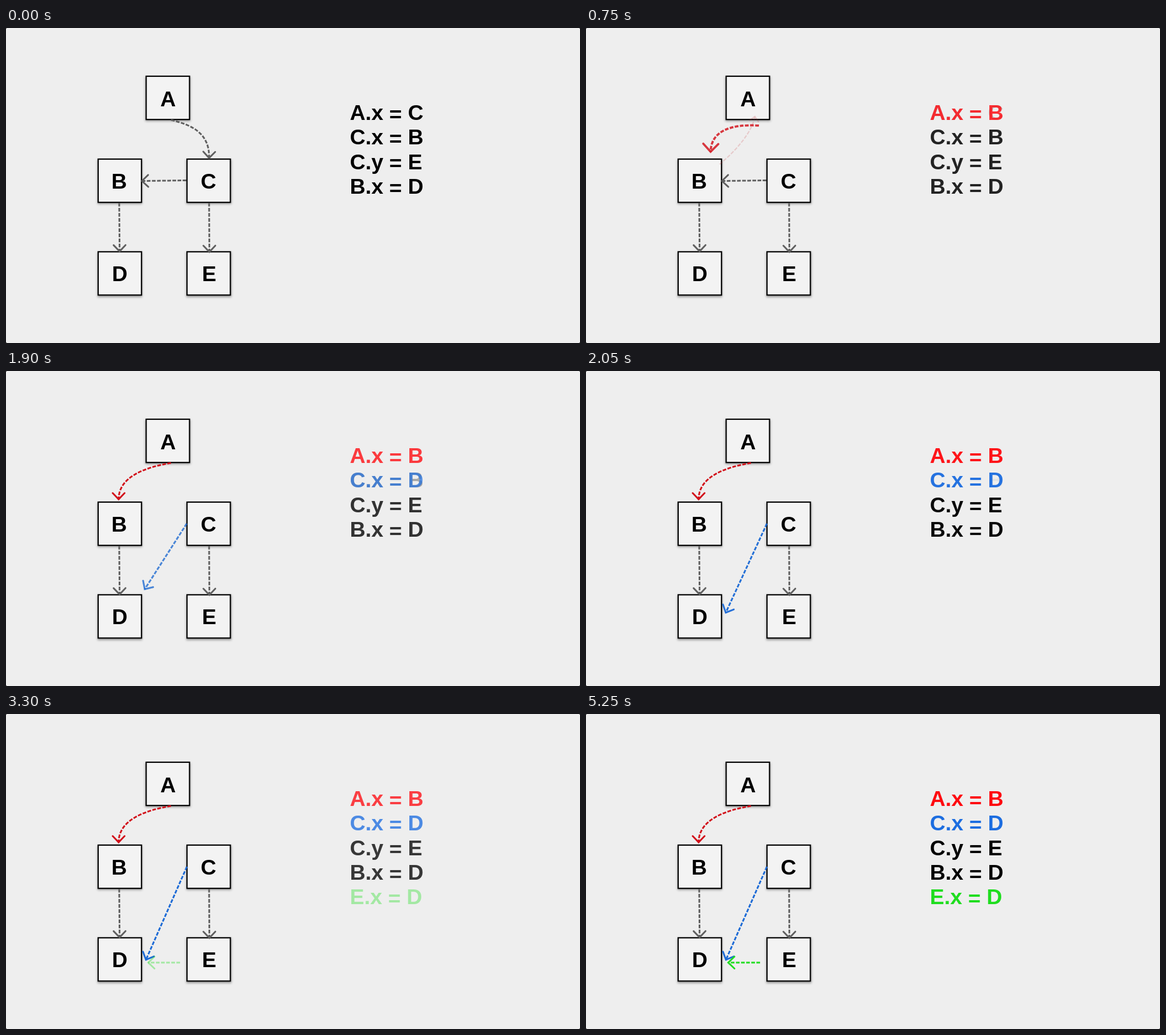
Recreate the animation shown at these times as an HTML page with a canvas. Size 1009 px wide and 555 px high, loop 5.3 s.

```html
<!DOCTYPE html>
<html lang="en">
<head>
<meta charset="utf-8">
<title>References</title>
<style>
html, body { margin: 0; height: 100%; overflow: hidden; background: #eee; }
canvas { display: block; }
</style>
</head>
<body>
<canvas id="stage" width="1009" height="555"></canvas>
<script>
const ctx = document.getElementById('stage').getContext('2d');
const LOOP = 5300, STEP = 50, SIDE = 76.2;
const GRAY = [96, 96, 96], RED = [210, 16, 26], BLUE = [29, 107, 214], GREEN = [32, 222, 32];
const K = '#000', R = '#fe0a10', B = '#1c6de0', G = '#1fdd1f';

// box: letter, left, top, letter centre, baseline
const boxes = [
  ['A', 246.4, 85, 285, 138],
  ['B', 162, 231, 198.8, 282.5],
  ['C', 318.2, 231, 356, 282.5],
  ['D', 162, 394.3, 200, 446],
  ['E', 318.2, 394.3, 357.2, 446]
];

const lists = [
  [['A.x = C', K], ['C.x = B', K], ['C.y = E', K], ['B.x = D', K]],
  [['A.x = B', R], ['C.x = B', K], ['C.y = E', K], ['B.x = D', K]],
  [['A.x = B', R], ['C.x = D', B], ['C.y = E', K], ['B.x = D', K]],
  [['A.x = B', R], ['C.x = D', B], ['C.y = E', K], ['B.x = D', K], ['E.x = D', G]]
];

// Arrow poses: start, two control points, end
const line = (x, y, u, v) => [x, y, x + (u - x) / 3, y + (v - y) / 3,
  x + (u - x) * 2 / 3, y + (v - y) * 2 / 3, u, v];
const aToC = [290, 162, 328, 171, 358, 186, 357, 229];
const aToCLeave = [223, 257, 255, 221, 278, 181, 284, 140];
const aToBEnter = [369, 218, 311, 164, 322, 153, 317, 181];
const aToB = [290, 162, 243, 170, 198, 187, 198, 226];
const cToB = line(317, 268.5, 239, 269.5);
const cToD = line(318, 269, 246, 433);

const mix = (a, b, p) => a.map((v, i) => v + (b[i] - v) * p);
const progress = (t, from, to, power) => {
  const u = Math.min(1, Math.max(0, (t - from) / (to - from)));
  return 1 - (1 - u) ** power;
};

function drawBox([letter, x, y, cx, base]) {
  ctx.save();
  ctx.shadowColor = 'rgba(0,0,0,.4)';
  ctx.shadowBlur = 4;
  ctx.shadowOffsetY = 2;
  ctx.fillStyle = '#000';
  ctx.fillRect(x - 1.1, y - 1.1, SIDE + 2.2, SIDE + 2.2);
  ctx.restore();
  ctx.fillStyle = '#f3f3f3';
  ctx.fillRect(x + 1.1, y + 1.1, SIDE - 2.2, SIDE - 2.2);
  ctx.fillStyle = '#000';
  ctx.textAlign = 'center';
  ctx.fillText(letter, cx, base);
}

function drawArrow(pose, color, alpha = 1, scale = 1) {
  if (alpha <= 0) return;
  const [x, y, ax, ay, bx, by, ex, ey] = pose;
  const len = Math.hypot(ex - bx, ey - by) || 1;
  const dx = (ex - bx) / len, dy = (ey - by) / len;
  const back = 11 * scale, side = 10.5 * scale;
  ctx.globalAlpha = alpha;
  ctx.strokeStyle = `rgb(${color})`;
  ctx.lineWidth = 3 * scale;
  ctx.lineCap = 'butt';
  ctx.setLineDash([6.5, 2.5]);
  ctx.beginPath();
  ctx.moveTo(x, y);
  ctx.bezierCurveTo(ax, ay, bx, by, ex, ey);
  ctx.stroke();
  ctx.setLineDash([]);
  ctx.lineCap = 'round';
  ctx.beginPath();
  ctx.moveTo(ex - dx * back - dy * side, ey - dy * back + dx * side);
  ctx.lineTo(ex, ey);
  ctx.lineTo(ex - dx * back + dy * side, ey - dy * back - dx * side);
  ctx.stroke();
  ctx.globalAlpha = 1;
}

// The equals sign sits a little lower than the font places it
function drawRow(text, x, y) {
  const [left, right] = text.split('=');
  const signX = x + ctx.measureText(left).width;
  ctx.fillText(left, x, y);
  ctx.fillText('=', signX, y + 2.8);
  ctx.fillText(right, signX + ctx.measureText('=').width, y);
}

function drawList(rows, alpha) {
  if (alpha <= 0) return;
  ctx.globalAlpha = alpha;
  ctx.textAlign = 'left';
  rows.forEach(([text, color], i) => {
    ctx.fillStyle = color;
    drawRow(text, 604.5, 162 + i * 43.3);
  });
  ctx.globalAlpha = 1;
}

function draw(t) {
  const p = progress(t, 550, 950, 2.5);
  const q = progress(t, 1750, 2250, 3.4);
  const r = progress(t, 3200, 3550, 1.33);
  const swell = Math.sin(Math.PI * p) / 2;

  ctx.fillStyle = '#000';
  ctx.fillRect(0, 0, 1009, 555);
  ctx.fillStyle = '#eee';
  ctx.beginPath();
  ctx.roundRect(0, 0, 1009, 555, 2);
  ctx.fill();

  ctx.font = 'bold 37.8px "Liberation Sans", Arial, sans-serif';
  boxes.forEach(drawBox);

  drawArrow(line(199, 308, 199.7, 393.5), GRAY);
  drawArrow(line(357, 308, 357.5, 394.5), GRAY);
  drawArrow(mix(aToC, aToCLeave, p), mix(GRAY, RED, p), 1 - p, 1 - swell);
  drawArrow(mix(aToBEnter, aToB, p), RED, p, 1 + swell);
  drawArrow(mix(cToB, cToD, q), mix(GRAY, BLUE, q), 1 - q);
  drawArrow(mix(cToB, cToD, q), BLUE, q);
  drawArrow(line(306, 438, 250, 438), GREEN, r);

  [1 - p, p * (1 - q), q * (1 - r), r].forEach((alpha, i) => drawList(lists[i], alpha));
}

const begin = performance.now();
function tick() {
  const t = (performance.now() - begin) % LOOP;
  draw(Math.floor(t / STEP) * STEP);
  requestAnimationFrame(tick);
}
tick();
</script>
</body>
</html>
```
